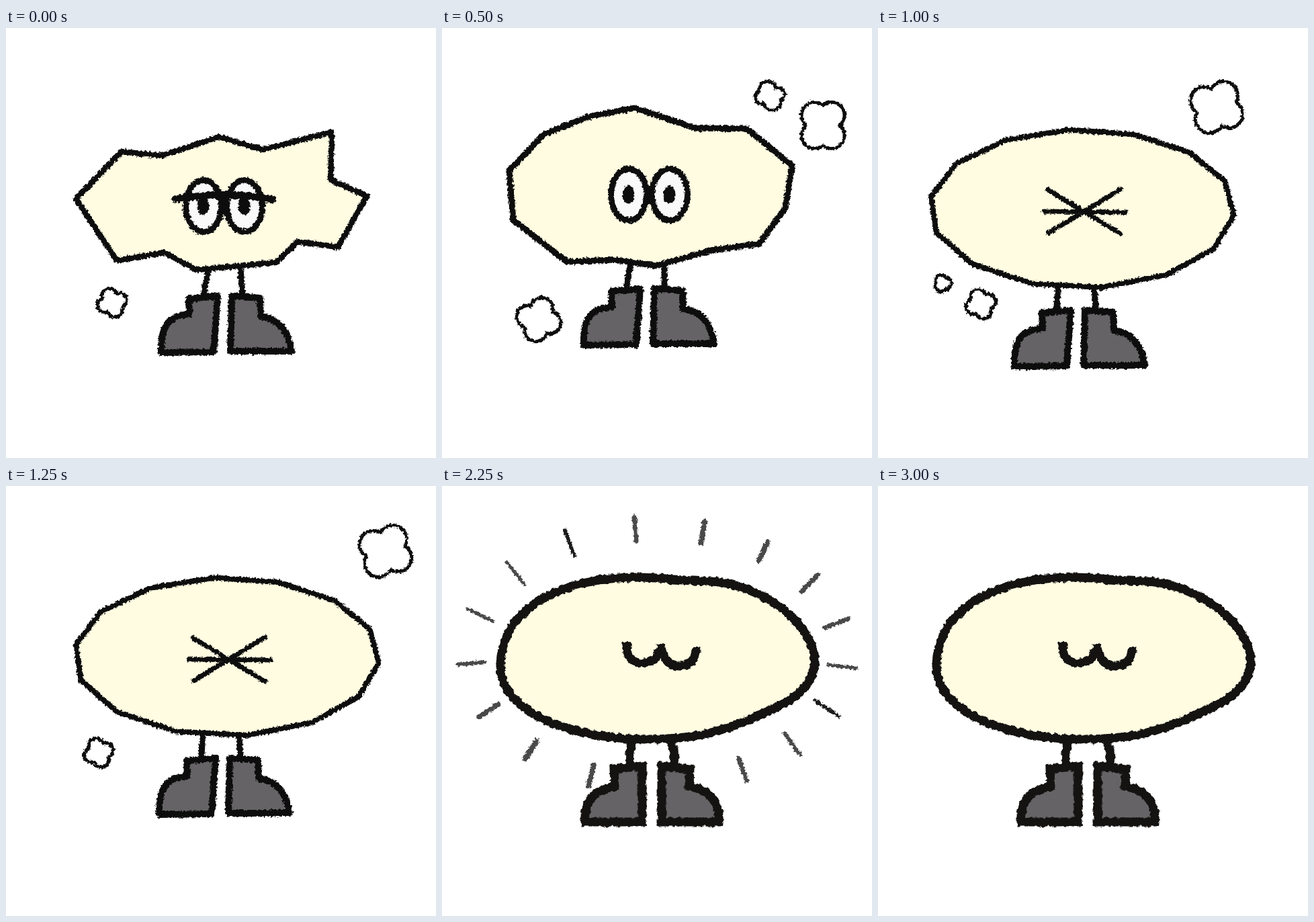
Write an HTML page that moves like this. It is 640 by 640 pixels and loops after 3.25 s.

```html
<!DOCTYPE html>
<html lang="en">
<head>
<meta charset="utf-8">
<title>Rock to egg</title>
<style>
  html, body { margin: 0; width: 100%; height: 100%; overflow: hidden; background: #fff; }
  svg { display: block; width: 100%; height: 100%; }
  path, ellipse { fill: none; stroke: #0d0d0d; stroke-linecap: round; stroke-linejoin: round; }
  .skin { fill: #fffce1; }
  .boot { fill: #656365; }
  .white { fill: #f9f9f9; }
  .solid { fill: #0d0d0d; stroke: none; }
  #happy path { stroke: #141311; stroke-width: 13; stroke-linecap: butt; stroke-linejoin: miter; }
</style>
</head>
<body>
<svg viewBox="0 0 640 640">
  <filter id="crayon" filterUnits="userSpaceOnUse" x="0" y="0" width="640" height="640" color-interpolation-filters="sRGB">
    <feTurbulence type="fractalNoise" baseFrequency=".3" numOctaves="2" seed="4"/>
    <feDisplacementMap in="SourceGraphic" scale="6" xChannelSelector="R" yChannelSelector="G"/>
  </filter>
  <filter id="marker" filterUnits="userSpaceOnUse" x="0" y="0" width="640" height="640" color-interpolation-filters="sRGB">
    <feTurbulence type="fractalNoise" baseFrequency=".16" numOctaves="2" seed="7"/>
    <feDisplacementMap in="SourceGraphic" scale="6" xChannelSelector="R" yChannelSelector="G"/>
  </filter>
  <g id="sketch" filter="url(#crayon)"></g>
  <g id="happy" filter="url(#marker)">
    <path d="M283 380Q278 398 280 418M340 380Q348 394 345 414"/>
    <path id="boot" class="boot" d="M256 421L298 417V500H213C211 466 230 452 257 447Z"/>
    <use href="#boot" transform="translate(625 0) scale(-1 1)"/>
    <path class="skin" d="M87 268C88 180 180 136 290 136C330 136 350 141 400 142C475 146 555 205 555 262C553 300 520 320 490 333C440 355 400 377 305 377C200 377 87 340 87 268Z"/>
    <path d="M275 232C274 252 279 263 297 263C316 263 325 252 326 235M326 236C330 256 335 268 352 268C370 268 378 257 379 239"/>
  </g>
  <g id="rays" filter="url(#crayon)"></g>
</svg>
<script>
const STEP = 250, LOOP = 3250, RAYS = 16;
const $ = id => document.getElementById(id);
const rad = degrees => degrees * Math.PI / 180;
const path = (d, width, cls = '') => `<path class="${cls}" stroke-width="${width}" d="${d}"/>`;
const shift = (x, y, content) => `<g transform="translate(${x} ${y})">${content}</g>`;
const oval = (x, y, rx, ry, cls) => `<ellipse class="${cls}" cx="${x}" cy="${y}" rx="${rx}" ry="${ry}" stroke-width="9"/>`;

// Evenly spread points on an ellipse; lean swells its lower left side.
const ring = (x, y, rx, ry, count, turn, lean = 0) => Array.from({ length: count }, (_, i) => {
  const a = rad(turn + 360 * i / count), r = 1 + lean * Math.cos(a - rad(120));
  return [x + rx * r * Math.cos(a), y + ry * r * Math.sin(a)];
});

// A cloud is a ring joined by half circles that bulge outwards.
function puff(x, y, rx, ry, lobes, turn) {
  const points = ring(x, y, rx / 1.4, ry / 1.4, lobes, turn);
  const arcs = points.map((p, i) => {
    const next = points[(i + 1) % lobes];
    const r = Math.hypot(next[0] - p[0], next[1] - p[1]) / 2;
    return `A${r} ${r} 0 0 1 ${next}`;
  });
  return path(`M${points[0]}${arcs.join('')}Z`, 5);
}

const boots =
  path('M272 403L315 399L309 482L231 483C230 445 240 428 273 426Z', 10, 'boot') +
  path('M336 399L378 402L379 429C408 433 420 452 425 481L334 481Z', 10, 'boot');

const eye = x => oval(x, 265, 26.5, 38.5, 'white') + oval(x - .5, 265, 9, 13.5, 'solid');
const eyes = eye(294) + eye(355) + path('M318 245L325 252L331 245V272L325 280L319 272Z', 2, 'solid');

const jagged = path('M301 361L294 396M349 357L352 396', 9) + boots +
  path('M104 254L172 184L232 190L317 162L382 181L485 155L483 226L537 250L494 326L434 318L402 349L283 360L236 334L165 346Z', 8.5, 'skin') +
  eyes + path('M252 255Q325 242 396 255', 11);

const lumpy = path('M281 349L274 386M331 350V386', 9) + shift(-20, -11, boots) +
  path('M100 212L152 158L218 132L287 119L377 149L454 150L521 205L511 268L472 321L400 331L318 354L258 345L186 348L106 286Z', 9, 'skin') +
  shift(-16, -17, eyes);

const smooth = path('M268 378L266 417M321 376L324 417', 9) + shift(-28, 21, boots) +
  path(`M${ring(308, 265, 227, 118, 14, 161, .04).join('L')}Z`, 8, 'skin') +
  path('M253 241L361 306M254 305L361 240M247 273L369 274', 7);

const poses = [
  jagged + puff(158, 409, 23, 21, 4, 25),
  shift(20, -20, jagged) + puff(151, 447, 33, 33, 4, 60),
  lumpy + puff(144, 434, 33, 33, 4, 60) + puff(488, 101, 26, 18, 4, 30) + puff(567, 145, 35, 42, 4, 0),
  shift(29, 28, lumpy) + puff(127, 400, 32, 29, 3, 85) + puff(481, 81, 23, 23, 3, 73) + puff(546, 150, 43, 34, 4, 50),
  smooth + puff(96, 380, 13, 14, 3, 65) + puff(153, 411, 23, 22, 4, 25) + puff(504, 118, 42, 40, 4, 75),
  shift(25, -15, smooth) + puff(138, 397, 23, 21, 4, 25) + puff(565, 97, 42, 40, 4, 75)
];

// Rays stand square to an ellipse, open below; long ones are thin.
function ray(i) {
  const a = rad(113.5 + 20.6 * i + 6 * Math.sin(.24 * (i - 2)));
  const x = 320 + 277 * Math.cos(a), y = 253 + 190 * Math.sin(a);
  const normal = Math.atan2(Math.sin(a) / 190, Math.cos(a) / 277);
  const wave = Math.cos((i - 4.7) * Math.PI / 4), half = 18.5 + 3 * wave;
  const dx = half * Math.cos(normal), dy = half * Math.sin(normal);
  const line = path(`M${x - dx} ${y - dy}L${x + dx} ${y + dy}`, 6.5 - 1.5 * wave);
  return i % 7 === 6 ? line + line : line;
}
$('rays').innerHTML = Array.from({ length: RAYS }, (_, i) => ray(i)).join('');

const start = performance.now();
let shown = -1;

function draw() {
  const step = Math.floor((performance.now() - start) % LOOP / STEP);
  if (step !== shown) {
    shown = step;
    const happy = step >= poses.length;
    $('sketch').innerHTML = happy ? '' : poses[step];
    $('happy').style.display = $('rays').style.display = happy ? '' : 'none';
    $('rays').style.strokeOpacity = Math.min(1, (12 - step) / 4);
  }
  requestAnimationFrame(draw);
}
draw();
</script>
</body>
</html>
```
